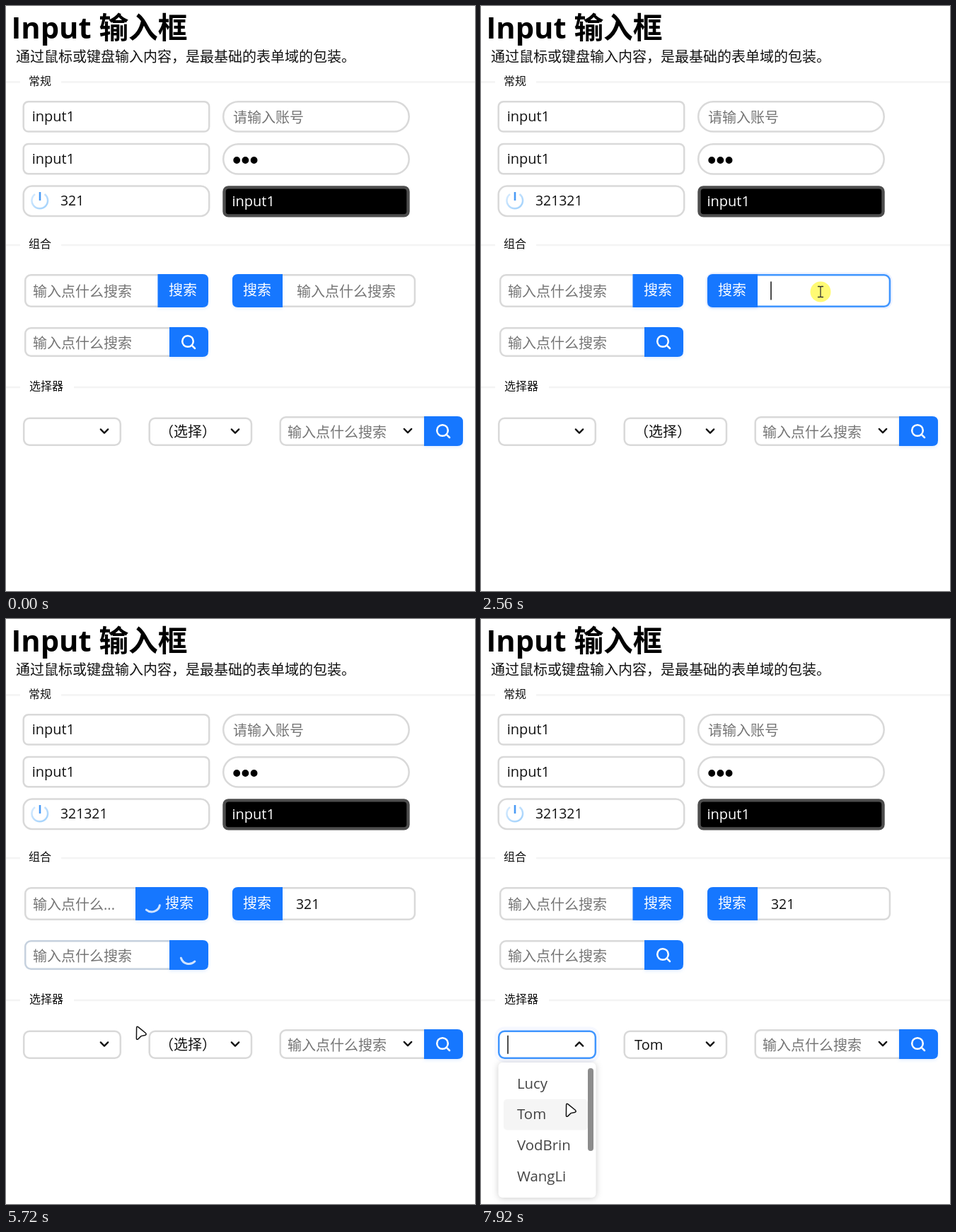
These frames come from a looping animation (663x827 px, 8000 ms). An HTML page:

```html
<!DOCTYPE html>
<html lang="zh-CN">
<head>
<meta charset="utf-8">
<title>Input</title>
<style>
html, body { margin: 0; width: 100%; height: 100%; overflow: hidden; background: #fff; }
svg { display: block; width: 663px; height: 827px; }
text { font: 20px "Open Sans", "Noto Sans CJK SC", "Noto Sans CJK", sans-serif; fill: #111; white-space: pre; }
.title { font-size: 41.7px; font-weight: 700; fill: #000; }
.label { font-size: 16px; }
.num { font-size: 19.4px; }
.hint { fill: #757575; }
.white { fill: #fff; }
.item { font-size: 20.4px; fill: #444; }
.button { fill: #1677ff; filter: drop-shadow(0 2px 2px #1677ff20); }
.rule { stroke: #f4f4f4; stroke-width: 2.5; }
.line { fill: none; stroke: #111; stroke-width: 2.3; stroke-linecap: round; stroke-linejoin: round; }
.lens { fill: none; stroke: #fff; stroke-width: 2.5; stroke-linecap: round; }
.halo { fill: none; stroke: #4070ff; }
.box { fill: #fff; stroke-width: 2.5; }
.panel { fill: #fff; filter: drop-shadow(0 1px 5px #0003); }
.row { fill: #f5f5f5; }
.bar { fill: #8c8c8c; }
.spin { fill: none; stroke: #fff; stroke-width: 3; stroke-linecap: round; opacity: .8; }
</style>
</head>
<body>
<svg viewBox="0 0 663 827">
  <defs>
    <path id="chevron" class="line" d="M-5.2-2.6L0 2.6L5.2-2.6"/>
    <g id="lens" class="lens"><circle r="7.8"/><path d="M5.8 5.8L10 10"/></g>
    <path id="arc" class="spin" d="M5.8-10A11.6 11.6 0 0 1 5.8 10"/>
    <linearGradient id="ring" x1="0" x2="1" y1="0" y2="1">
      <stop stop-color="#d6ebff"/><stop offset="1" stop-color="#9fd0fb"/>
    </linearGradient>
  </defs>

  <text class="title" x="7.5" y="45.5">Input 输入框</text>
  <text x="14" y="79">通过鼠标或键盘输入内容，是最基础的表单域的包装。</text>
  <path class="rule" d="M0 107.5H20M78 107.5H663M0 338H20M78 338H663M0 539H20M96 539H663"/>
  <text class="label" x="32" y="112">常规</text>
  <text class="label" x="32" y="342">组合</text>
  <text class="label" x="33" y="543">选择器</text>

  <g id="halos"></g>
  <g id="boxes"></g>

  <text x="36.7" y="163">input1</text>
  <text x="36.7" y="223">input1</text>
  <text class="hint" x="321" y="165">请输入账号</text>
  <path d="M326.2 218h25" stroke="#000" stroke-width="9.8" stroke-linecap="round" stroke-dasharray="0 12.2"/>
  <rect x="308.5" y="256.4" width="260" height="40" rx="6" stroke="#4d4d4d" stroke-width="4.4"/>
  <text class="white" x="319.5" y="283">input1</text>
  <path d="M41 266A11.3 11.3 0 1 0 54.5 266" fill="none" stroke="url(#ring)" stroke-width="2.5"/>
  <path d="M48 263V275" stroke="#4a9bf5" stroke-width="2.6"/>
  <text class="num" id="powerText" x="77" y="282"></text>

  <rect id="selection" y="389" height="28" fill="#0078d7" opacity=".4"/>
  <text class="hint" id="leftHint" x="38" y="411"></text>
  <text class="num" id="leftText" x="38" y="410"></text>
  <path id="leftButton" class="button"/>
  <text class="white" id="leftLabel" y="409">搜索</text>
  <use id="leftSpin" href="#arc"/>

  <path id="rightButton" class="button"/>
  <text class="white" id="rightLabel" y="409">搜索</text>
  <use id="rightSpin" href="#arc"/>
  <text class="hint" id="rightHint" x="411" y="411">输入点什么搜索</text>
  <text class="num" id="rightText" y="410"></text>

  <text class="hint" x="38" y="484">输入点什么搜索</text>
  <path id="lowerButton" class="button"/>
  <use id="lowerLens" href="#lens" x="257" y="474"/>
  <use id="lowerSpin" href="#arc"/>

  <text id="choice" x="217" y="609"></text>
  <use id="chevron1" href="#chevron"/>
  <use id="chevron2" href="#chevron"/>
  <use href="#chevron" x="568" y="600.5"/>
  <text class="hint" x="398" y="610">输入点什么搜索</text>
  <path id="combinedButton" class="button"/>
  <use href="#lens" x="617" y="600"/>

  <g id="list1">
    <rect class="panel" x="24.5" y="627" width="138" height="191" rx="6"/>
    <rect class="row" id="row1" x="32" width="119" height="43.7" rx="5"/>
    <rect class="bar" x="151" y="635" width="8" height="117" rx="4"/>
  </g>
  <g id="list2">
    <rect class="panel" x="202.5" y="627" width="183" height="190" rx="6"/>
    <rect class="row" id="row2" x="210" width="164" height="43.7" rx="5"/>
    <path class="rule" d="M210 770.5H374" style="stroke-width:1.2"/>
    <rect class="bar" x="374" y="635" width="8" height="114" rx="4"/>
  </g>

  <path id="caret" stroke="#000" stroke-width="1.4"/>
  <circle id="press" r="14.5" fill="#fff95c" opacity=".85"/>
  <path id="beam" class="line" style="stroke-width:1.3;stroke:#333" d="M-3.5-7.5H-1Q0-7.5 0-6.5Q0-7.5 1-7.5H3.5M0-6.5V6.5M-3.5 7.5H-1Q0 7.5 0 6.5Q0 7.5 1 7.5H3.5"/>
  <path id="arrow" fill="#fff" stroke="#111" stroke-width="1.5" d="M.6 3Q.6.2 3 1.8L13.3 10.2Q15.5 12.6 12.3 13.4L7 14.6L3 18.6Q.3 20.5.4 17.4Z"/>
</svg>
<script>
const LOOP = 8000, LOADING = 1610, TYPE_DELAY = 240, ERASED = 4900;
const $ = id => document.getElementById(id);
const set = (node, attrs) => { for (const k in attrs) node.setAttribute(k, attrs[k]); return node; };
const make = (parent, tag, attrs) =>
  $(parent).appendChild(set(document.createElementNS('http://www.w3.org/2000/svg', tag), attrs));
const show = (id, on) => { $(id).style.display = on ? '' : 'none'; };
const move = (id, x, y, more = '') => set($(id), { transform: `translate(${x} ${y}) ${more}` });
const ramp = (t, start, length) => Math.min(1, Math.max(0, (t - start) / length));
const inside = ({ x, y, width, height }, [px, py]) =>
  px >= x && px <= x + width && py >= y && py <= y + height;

const fields = {};
function addField(name, x, y, width, height, rx, caretX) {
  const shape = { x, y, width, height, rx };
  fields[name] = {
    ...shape, caretX,
    halo: make('halos', 'rect', { ...shape, class: 'halo' }),
    box: make('boxes', 'rect', { ...shape, class: 'box' })
  };
}
['first', 'second', 'power'].forEach((name, i) =>
  addField(name, 24.7, 135.2 + i * 59.7, 262.5, 42.4, i < 2 ? 7 : 12, 77));
['account', 'password'].forEach((name, i) =>
  addField(name, 307.2, 135.2 + i * 60, 262.5, 42.4, 21.2, 359));
addField('left', 27.2, 380.2, 257, 44.6, 8, 38);
addField('right', 321.2, 380.2, 256.7, 44.6, 8, 410);
addField('lower', 27.2, 455.2, 257, 39.6, 8, 38);
addField('editable', 25.2, 582.7, 136.6, 38.1, 8, 38);
addField('choose', 202.7, 582.7, 144.3, 38.1, 8);
addField('combined', 387.7, 581.2, 257, 39.6, 8);

// A button is flat at one edge and rounded at the other
const buttons = {};
function drawButton(name, flat, round, y, height) {
  const s = Math.sign(round - flat) * 8;
  buttons[name] = { x: Math.min(flat, round), y, width: Math.abs(round - flat), height };
  set($(name + 'Button'), {
    d: `M${flat} ${y}H${round - s}q${s} 0 ${s} 8v${height - 16}q0 8 ${-s} 8H${flat}Z`
  });
}
drawButton('lower', 231, 286, 454, 42);
drawButton('combined', 591, 646, 580, 42);

const names = ['Lucy', 'Tom', 'VodBrin', 'WangLi'];
names.forEach((name, i) => {
  const y = 663.5 + i * 43.7, gap = i === 3 ? 7.5 : 0;
  make('list1', 'text', { class: 'item', x: 51, y }).textContent = name;
  make('list2', 'text', { class: 'item', x: 265, y: y + gap }).textContent = name;
  make('list2', 'circle', { cx: 240.7, cy: y - 6.3 + gap, r: 3.8, fill: i % 3 ? '#67c23a' : '#ff5a52' });
});

// Where the pointer arrives, when, and what it clicks there
const stops = [
  [80, 215, 424], [640, 190, 160], [1400, 400, 215, 'password'], [1740, 203, 284, 'power'],
  [2460, 480, 404, 'right'], [2860, 350, 404, 'rightButton'], [3180, 169, 414, 'left'],
  [4330, 245, 408, 'leftButton'], [4640, 89, 399, 'left'], [4840, 4, 404],
  [5160, 258, 475, 'lowerButton'], [5720, 184, 575], [6040, 300, 605, 'open'],
  [6520, 271, 664], [6980, 275, 695, 'pick'], [7540, 100, 603, 'editable'], [7920, 120, 684]
];
const clicks = stops.filter(s => s[3]).map(([t, , , name]) => ({ t: t + 20, name }));
const clickTime = name => clicks.find(c => c.name === name).t;

function pointer(t) {
  const i = Math.max(1, stops.findLastIndex(s => s[0] <= t) + 1);
  const [, x0, y0] = stops[i - 1], [arrive, x1, y1] = stops[i] || stops[i - 1];
  const travel = 120 + .55 * Math.hypot(x1 - x0, y1 - y0);
  const p = ramp(t, arrive - travel, travel), e = p * p * (3 - 2 * p);
  return [x0 + (x1 - x0) * e, y0 + (y1 - y0) * e];
}

function focusAt(t) {
  const last = clicks.findLast(c => c.t <= t);
  return last && fields[last.name] ? last : null;
}

function typed(name, t) {
  const start = clickTime(name) + TYPE_DELAY;
  return '321'.slice(0, Math.max(0, Math.floor((t - start) / 80) + 1));
}
const values = t => ({
  power: '321' + typed('power', t),
  right: typed('right', t),
  left: t < ERASED ? typed('left', t) : ''
});

// Share of the last 160 ms spent over a field
function hoverShare(field, t) {
  const steps = 8;
  let hits = 0;
  for (let i = 0; i < steps; i++) {
    const past = t - i * 160 / steps;
    if (past >= 80 && inside(field, pointer(past))) hits++;
  }
  return hits / steps;
}

function drawFields(t, focus) {
  for (const name in fields) {
    const field = fields[name];
    const warm = focus?.name === name ? 1 : hoverShare(field, t);
    const mix = to => Math.round(217 + (to - 217) * warm);
    set(field.box, { stroke: `rgb(${mix(64)},${mix(150)},${mix(255)})` });
    const start = clicks.findLast(c => c.name === name && c.t <= t)?.t ?? -LOOP;
    const p = ramp(t, start, 650);
    set(field.halo, { 'stroke-width': 2 + 14 * Math.sqrt(p), opacity: .11 * (1 - p) });
  }
}

function spin(name, t, x, y) {
  const age = t - clickTime(name + 'Button');
  const busy = age >= 0 && age < LOADING;
  show(name + 'Spin', busy);
  move(name + 'Spin', x, y, `rotate(${age * .395 - 110})`);
  return busy;
}

function drawSearch(t, focus, value, at) {
  const leftBusy = spin('left', t, 206, 402.5);
  const rightBusy = spin('right', t, 343.5, 402.5);
  const lowerBusy = spin('lower', t, 258.5, 476);
  const rightShift = rightBusy ? 31 : 0;

  drawButton('left', leftBusy ? 183 : 214.5, 286, 379, 47);
  drawButton('right', 391 + rightShift, 320, 379, 47);
  set($('leftLabel'), { x: leftBusy ? 225 : 230 });
  set($('rightLabel'), { x: rightBusy ? 361 : 335 });
  set($('rightText'), { x: 410 + rightShift });

  for (const name in value) $(name + 'Text').textContent = value[name];
  $('leftHint').textContent = value.left || focus?.name === 'left' ? ''
    : leftBusy ? '输入点什么...' : '输入点什么搜索';
  show('rightHint', t < clickTime('right'));
  show('lowerLens', !lowerBusy);

  const from = Math.max(38, at[0]), width = Math.max(0, 71 - from);
  show('selection', t > 4660 && t < ERASED);
  set($('selection'), { x: from, width });
}

function drawLists(t, y) {
  const picked = clickTime('pick');
  const open1 = ramp(t, clickTime('editable'), 200);
  const open2 = ramp(t, clickTime('open'), 200) * (1 - ramp(t, picked, 140));
  const row = Math.floor((y - 635) / 43.7);
  [[1, open1, 139], [2, open2, 324]].forEach(([n, open, x]) => {
    show('list' + n, open > 0);
    set($('list' + n), { opacity: open });
    show('row' + n, row >= 0);
    set($('row' + n), { y: 635 + row * 43.7 });
    move('chevron' + n, x, 601, `scale(1 ${1 - 2 * open})`);
  });
  $('choice').textContent = t < picked ? '（选择）' : 'Tom';
}

function drawCaret(t, focus, value) {
  show('caret', focus && (t - focus.t) % 1060 < 530);
  if (!focus) return;
  const { caretX, y, height } = fields[focus.name];
  const x = caretX + (value[focus.name] || '').length * 11.1;
  set($('caret'), { d: `M${x} ${y + height / 2 - 13}v26` });
}

function drawPointer(t, at) {
  const over = shapes => Object.values(shapes).some(s => inside(s, at));
  const visible = t >= 80;
  const text = over(fields) && !over(buttons) && !inside(fields.choose, at);
  show('beam', visible && text);
  show('arrow', visible && !text);
  show('press', clicks.some(c => t >= c.t && t < c.t + 90));
  for (const id of ['beam', 'arrow', 'press']) move(id, ...at);
}

function draw(t) {
  const at = pointer(t), focus = focusAt(t), value = values(t);
  drawFields(t, focus);
  drawSearch(t, focus, value, at);
  drawLists(t, at[1]);
  drawCaret(t, focus, value);
  drawPointer(t, at);
}

const begin = performance.now();
function tick() {
  draw((performance.now() - begin) % LOOP);
  requestAnimationFrame(tick);
}
tick();
</script>
</body>
</html>
```
